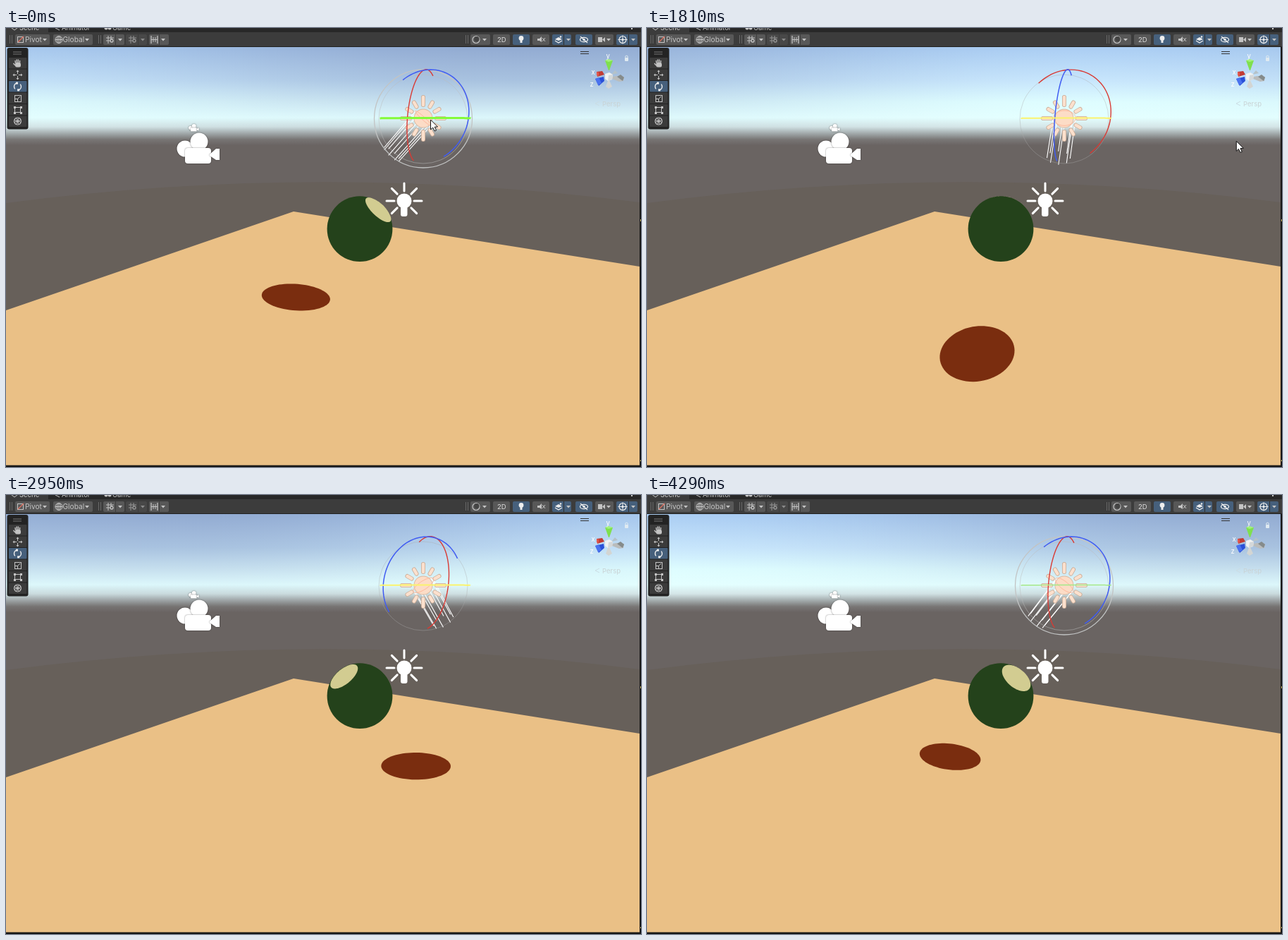
Animation of 901x622 px, one loop 4910 ms. Source, as an HTML page with a canvas:

```html
<!DOCTYPE html>
<html lang="en">
<head>
<meta charset="utf-8">
<title>Rotating sun in a scene view</title>
<style>
  html, body { margin: 0; width: 100%; height: 100%; overflow: hidden; background: #191919; }
  canvas { display: block; }
</style>
</head>
<body>
<canvas id="stage" width="901" height="622"></canvas>
<script>
const c = document.getElementById('stage').getContext('2d');
const LOOP = 4910, TAU = Math.PI * 2, RAD = Math.PI / 180;
const { sin, cos, floor, min, max, hypot, atan2 } = Math;

// ---- Camera: horizontal X/Z, Y up, origin at the eye ----
const FOCAL = 513, TILT = 20.5 * RAD;
const project = ([x, y, z]) => {
  const depth = z * cos(TILT) - y * sin(TILT);
  const up = y * cos(TILT) + z * sin(TILT);
  return [450 + FOCAL * x / depth, 323 - FOCAL * up / depth];
};
const dot = (a, b) => a[0] * b[0] + a[1] * b[1] + a[2] * b[2];
const mix = (...terms) => [0, 1, 2].map(i => terms.reduce((s, [k, v]) => s + k * v[i], 0));
const unit = v => mix([1 / hypot(...v), v]);
const UP = [0, 1, 0];
const TO_VIEWER = [0, sin(TILT), -cos(TILT)];
const heading = a => [sin(a), 0, cos(a)];

const BALL = [0.565, -1.5627, 5.362], BALL_R = 0.5, GROUND_Y = -2.98;
const SUN = [0.277, 0.006, 1.07], SUN_PITCH = 50 * RAD;

// ---- Timing: sun heading in degrees at given times ----
const KEYS = [[490, -63.7], [1270, -115.6], [1810, -161.5], [2650, -258.5],
              [3240, -324.3], [3650, -367], [4282, -405]];
const START = KEYS[0][1], END_TIME = 4282;

function stepTime(t) {
  if (t < 490) return 490;
  if (t < 3182) return 490 + 60 * floor((t - 490) / 60);
  return min(END_TIME, 3182 + 57.9 * floor((t - 3182) / 57.9 + 1e-6));
}

function headingAt(t) {
  const last = KEYS.length - 1;
  if (t >= KEYS[last][0]) return KEYS[last][1];
  const i = max(0, KEYS.findIndex(k => k[0] > t) - 1);
  const slope = j => {
    const a = KEYS[max(0, j - 1)], b = KEYS[min(last, j + 1)];
    return (b[1] - a[1]) / (b[0] - a[0]);
  };
  const [t0, v0] = KEYS[i], [t1, v1] = KEYS[i + 1], d = t1 - t0, u = (t - t0) / d;
  return v0 * (1 + 2 * u) * (1 - u) ** 2 + v1 * u * u * (3 - 2 * u)
    + slope(i) * d * u * (1 - u) ** 2 + slope(i + 1) * d * u * u * (u - 1);
}

// ---- Drawing helpers ----
function rect(x, y, w, h, color) { c.fillStyle = color; c.fillRect(x, y, w, h); }
function box(x, y, w, h, r, color) {
  c.beginPath(); c.roundRect(x, y, w, h, r); c.fillStyle = color; c.fill();
}
function trace(points, close) {
  c.beginPath();
  points.forEach(p => c.lineTo(...p));
  if (close) c.closePath();
}
function poly(color, ...points) { trace(points, true); c.fillStyle = color; c.fill(); }
function line(color, width, ...points) {
  trace(points); c.strokeStyle = color; c.lineWidth = width; c.stroke();
}
function disc(x, y, r, color) { c.beginPath(); c.arc(x, y, r, 0, TAU); c.fillStyle = color; c.fill(); }
function ring(x, y, r, color, width) {
  c.beginPath(); c.arc(x, y, r, 0, TAU); c.strokeStyle = color; c.lineWidth = width; c.stroke();
}
function text(s, x, y, size, color) {
  c.font = `${size}px Inter, sans-serif`; c.fillStyle = color; c.fillText(s, x, y);
}
function sweep(from, to, n, f) {
  return Array.from({ length: n + 1 }, (_, i) => f(from + (to - from) * i / n));
}

// ---- Sky ----
const SKY_Y = [27, 75, 105, 127, 140, 150, 158, 166];
function skyGradient(colors) {
  const g = c.createLinearGradient(0, 27, 0, 166);
  colors.split(' ').forEach((col, i) => g.addColorStop((SKY_Y[i] - 27) / 139, '#' + col));
  return g;
}
const DIM_SKY = skyGradient('92abd2 a9c3e0 c6dfee dcf7fb c9dadd 9a9fa1 767372 6a6463');
const BRIGHT_SKY = skyGradient('aacdf3 c8e6fc defdff e4ffff d5e6e8 a1a9aa 7a7877 6a6463');

function drawSky(yaw) {
  rect(0, 27, 899, 139, DIM_SKY);
  // The sky is brightest towards the sun and directly away from it.
  for (let x = 0; x < 899; x += 6) {
    c.globalAlpha = cos(yaw - atan2(x - 447, FOCAL)) ** 2;
    rect(x, 27, 6, 139, BRIGHT_SKY);
  }
  c.globalAlpha = 1;
  rect(0, 166, 899, 260, '#6a6462');
  c.beginPath(); c.moveTo(0, 248); c.quadraticCurveTo(450, 189, 899, 247);
  c.lineTo(899, 420); c.lineTo(0, 420); c.fillStyle = '#67605a'; c.fill();
}

// ---- Ground, shadow and ball ----
function drawWorld(yaw) {
  poly('#eac086', [0, 400], [408, 260], [899, 338], [899, 620], [0, 620]);

  const away = heading(yaw), side = heading(yaw + Math.PI / 2);
  const reach = (BALL[1] - GROUND_Y) / Math.tan(SUN_PITCH);
  const foot = [BALL[0], GROUND_Y, BALL[2]];
  poly('#7a2d0f', ...sweep(0, TAU, 72, a => project(mix([1, foot],
    [reach + BALL_R / sin(SUN_PITCH) * cos(a), away], [BALL_R * sin(a), side]))));

  disc(502, 284.7, 46.4, '#24421b');

  // Lit cap; points behind the outline are moved onto it.
  const light = mix([-cos(SUN_PITCH), away], [sin(SUN_PITCH), UP]);
  const tangent = mix([sin(SUN_PITCH), away], [cos(SUN_PITCH), UP]);
  const view = unit(mix([-1, BALL])), rim = BALL_R / hypot(...BALL), cap = 29.5 * RAD;
  poly('#d2cc91', ...sweep(0, TAU, 120, a => {
    let n = mix([cos(cap), light], [sin(cap) * cos(a), tangent], [sin(cap) * sin(a), side]);
    const facing = dot(n, view);
    if (facing < rim) {
      n = mix([rim, view], [Math.sqrt(1 - rim * rim), unit(mix([1, n], [-facing, view]))]);
    }
    return project(mix([1, BALL], [BALL_R, n]));
  }));
}

// ---- Scene icons ----
function cameraIcon(x, y, scale) {
  c.save(); c.translate(x, y); c.scale(scale, scale);
  c.shadowColor = '#0008'; c.shadowBlur = 2;
  disc(12, 23, 11.5, '#fff'); disc(32, 13, 12.5, '#fff');
  box(12, 22, 37, 22, 4, '#fff');
  poly('#fff', [47, 31], [56, 23], [61, 23], [61, 39], [56, 39], [47, 33]);
  c.restore();
}

function bulbIcon() {
  c.lineCap = 'round';
  for (let i = -3; i <= 3; i++) {
    const a = i * 45 * RAD, dx = sin(a), dy = -cos(a);
    line('#fff', 3, [565 + 14 * dx, 245 + 14 * dy], [565 + 25 * dx, 245 + 25 * dy]);
  }
  c.lineCap = 'butt';
  disc(565, 245, 10.5, '#fff');
  box(560, 252, 9.5, 15, 3, '#fff');
}

function sunIcon() {
  c.lineCap = 'round';
  for (const [color, width] of [['#c9ab96', 6], ['#fbe0cd', 4.4]]) {
    for (let i = 0; i < 12; i++) {
      const a = i * 30 * RAD, far = i % 3 ? 26 : 30;
      line(color, width, [592 + 19 * cos(a), 128 + 19 * sin(a)],
        [592 + far * cos(a), 128 + far * sin(a)]);
    }
  }
  c.lineCap = 'butt';
  disc(592, 128, 13.5, '#d9b9a2'); disc(592, 128, 12.6, '#fcdcc6');
}

// ---- Rotation handle of the sun ----
function handleArc(dir, second, color, width) {
  const mid = atan2(dot(second, TO_VIEWER), dot(dir, TO_VIEWER));
  line(color, width, ...sweep(mid - Math.PI / 2, mid + Math.PI / 2, 48,
    a => project(mix([1, SUN], [0.12 * cos(a), dir], [0.12 * sin(a), second]))));
}

function drawHandle(yaw, dragging, hovered) {
  const away = heading(yaw), side = heading(yaw + Math.PI / 2);
  const forward = mix([cos(SUN_PITCH), away], [-sin(SUN_PITCH), UP]);
  const across = mix([sin(SUN_PITCH), away], [cos(SUN_PITCH), UP]);
  const onDisc = a => mix([1, SUN], [0.03 * cos(a), side], [0.03 * sin(a), across]);
  for (let i = 0; i < 8; i++) {
    const from = onDisc(i * TAU / 8);
    line('#fff', 1.1, project(from), project(mix([1, from], [0.13, forward])));
  }
  sunIcon();
  line('#ffb89c', 1, ...sweep(0, TAU, 40, a => project(onDisc(a))));

  ring(592, 129, 63, dragging ? '#aaaaaa66' : '#bbbbbb80', 1);
  if (!dragging) ring(592, 128.5, 69.5, '#c2c4c4', 1.3);
  const turn = (dragging ? yaw : START * RAD) + 277 * RAD;
  handleArc(heading(turn), UP, '#d93a34', 1.4);
  handleArc(heading(turn - Math.PI / 2), UP, '#405cf2', 1.5);
  const [color, width] = dragging ? ['#fbf36c', 2] : hovered ? ['#84fb38', 3] : ['#a5e887', 1.5];
  handleArc([0, 0, -1], [1, 0, 0], color, width);
}

// ---- Editor interface ----
const INK = '#c4c4c4', BLUE = '#46607c';

function arrowDown(x, color = INK) { poly(color, [x - 3, 15], [x + 3, 15], [x, 18.5]); }

function toolbar() {
  rect(0, 0, 901, 6, '#282828'); rect(0, 0, 60, 6, '#3c3c3c');
  rect(0, 6, 901, 21, '#3c3c3c'); rect(0, 26, 901, 1, '#222');
  text('Scene', 19, 3, 9.5, '#d2d2d2');
  text('Animator', 79, 3, 9.5, INK);
  text('Game', 151, 3, 9.5, INK);
  line(INK, 1, [8, 0], [12, 3], [16, 0]); line(INK, 1, [70, 0], [76, 3]);
  disc(142, 0, 2.5, INK); disc(147, 0, 2.5, INK);
  rect(887, 0, 2, 2, INK);
  for (const x of [5, 131, 652]) { rect(x, 10, 1, 12, '#696969'); rect(x + 3, 10, 1, 12, '#696969'); }

  const buttons = [[13, 49], [67, 56], [138, 30], [170, 30, '#484848'], [203, 28], [659, 28], [691, 24],
    [719, 24, BLUE], [747, 24], [775, 27, BLUE], [808, 24, BLUE], [836, 26], [866, 30, BLUE]];
  for (const [x, w, color] of buttons) box(x, 9, w, 15, 2, color || '#585858');
  for (const x of [55, 115, 162, 223, 679, 798, 855, 890]) arrowDown(x);
  arrowDown(194, '#8a8a8a');
  rect(155, 9, 1, 15, '#3c3c3c'); rect(187, 9, 1, 15, '#3c3c3c'); rect(217, 9, 1, 15, '#3c3c3c');
  rect(791, 9, 1, 15, '#303030'); rect(883, 9, 1, 15, '#303030');

  c.strokeStyle = INK; c.lineWidth = 1; c.strokeRect(16.5, 12.5, 8, 8);
  line('#e07060', 1.2, [17, 20], [25, 12]);
  text('Pivot', 27, 20, 10.2, INK);
  ring(75, 16.5, 5, INK, 1); line(INK, 1, [70, 16.5], [80, 16.5]); line(INK, 1, [75, 11.5], [75, 21.5]);
  c.beginPath(); c.ellipse(75, 16.5, 2.5, 5, 0, 0, TAU); c.stroke();
  text('Global', 80.5, 20, 10.2, INK);

  for (const [x, ink] of [[142, INK], [174, '#969696']]) {
    line(ink, 1, [x, 14], [x + 11, 14]); line(ink, 1, [x, 18], [x + 6, 18]);
    line(ink, 1, [x + 3, 11], [x + 3, 22]); line(ink, 1, [x + 7, 11], [x + 7, 16]);
    ring(x + 8, 18, 2, ink, 1.3);
  }
  line(INK, 1.3, [206, 11], [206, 22]); line(INK, 1.3, [215, 11], [215, 22]);
  line(INK, 1, [206, 16.5], [215, 16.5]); line(INK, 1, [209, 13], [209, 20]); line(INK, 1, [212, 13], [212, 20]);

  ring(667, 16.5, 5, INK, 1.2); disc(668, 15.5, 3.5, '#444');
  text('2D', 697, 20, 9.5, '#ddd');
  disc(731, 14.5, 3.4, '#eee'); rect(729.5, 16, 3, 5, '#eee');
  poly(INK, [754, 15], [757, 15], [760, 12], [760, 20], [757, 18], [754, 18]);
  line(INK, 1, [761, 14], [765, 19]); line(INK, 1, [765, 14], [761, 19]);
  poly('#eee', [779, 16], [784, 13], [789, 16], [784, 18]);
  line('#eee', 1.3, [779, 18], [784, 21], [789, 18]); disc(787, 12.5, 1.3, '#eee');
  c.beginPath(); c.ellipse(820, 16.5, 5.5, 3.2, 0, 0, TAU); c.strokeStyle = '#eee'; c.stroke();
  disc(820, 16.5, 1.7, '#eee'); line('#eee', 1.2, [815, 12], [825, 21]);
  rect(840, 13, 6, 7, INK); poly(INK, [846, 16.5], [850, 13], [850, 20]);
  ring(875, 16.5, 5, '#eee', 1.2); line('#eee', 1, [868.5, 16.5], [881.5, 16.5]);
  line('#eee', 1, [875, 10.5], [875, 22.5]); disc(875, 16.5, 1.5, '#eee');
}

function toolPanel() {
  box(1.5, 28, 30, 115.5, 3, '#232323');
  rect(10, 33.5, 12, 1, '#777'); rect(10, 36.5, 12, 1, '#777');
  for (let i = 0; i < 6; i++) box(4, 42 + i * 16.5, 25.5, 15.5, 1, i === 2 ? BLUE : '#3b3b3b');

  box(13, 49, 8, 6.5, 2.5, INK);
  for (let i = 0; i < 4; i++) line(INK, 1.4, [13.5 + i * 2, 50], [13 + i * 2.2, i % 3 ? 44.5 : 46]);
  line(INK, 1.4, [13, 53], [10.5, 50]);
  line(INK, 1, [11, 66.5], [22, 66.5]); line(INK, 1, [16.5, 61], [16.5, 72]);
  for (let i = 0; i < 4; i++) {
    c.save(); c.translate(16.5, 66.5); c.rotate(i * Math.PI / 2);
    poly(INK, [-2, -4.5], [2, -4.5], [0, -7]); c.restore();
  }
  disc(16.5, 66.5, 1.5, '#3b3b3b');
  c.strokeStyle = '#eee'; c.lineWidth = 1.4;
  for (const a of [2.4, 5.54]) {
    c.beginPath(); c.arc(16.5, 83, 5, a, a + 2.1); c.stroke();
    const x = 16.5 + 5 * cos(a + 2.1), y = 83 + 5 * sin(a + 2.1);
    rect(x - 1.5, y - 1.5, 3, 3, '#eee');
  }
  c.strokeStyle = INK; c.lineWidth = 1;
  c.strokeRect(12.5, 95.5, 9, 9); c.strokeRect(12.5, 100.5, 4, 4);
  line(INK, 1, [16.5, 100.5], [20, 97]);
  c.strokeStyle = INK; c.strokeRect(12.5, 112.5, 8, 7);
  for (const x of [11, 20]) for (const y of [111, 119]) rect(x, y, 3, 3, INK);
  ring(16.5, 132, 5, INK, 1); disc(16.5, 132, 1.6, INK);
  for (let i = 0; i < 4; i++) {
    const a = (i + 0.5) * Math.PI / 2;
    ring(16.5 + 3.4 * cos(a), 132 + 3.4 * sin(a), 1.8, INK, 1);
  }
}

function axisGizmo() {
  rect(815, 33, 12, 1, '#333'); rect(815, 36, 12, 1, '#333');
  text('y', 851.5, 43, 9.5, '#fff');
  text('x', 830.5, 66, 9.5, '#fff');
  text('z', 828.5, 83, 9.5, '#fff');
  poly('#b9bcbc', [855, 70], [866, 68], [877, 69], [876, 75], [870, 76]);
  poly('#858b8b', [867, 69], [872, 66], [877, 70], [875, 75]);
  poly('#d3d5d3', [855, 72], [860, 83], [855, 86], [851, 83]);
  poly('#b5c2c8', [859, 66], [864, 60], [868, 64]);
  poly('#c23b34', [838, 62], [846, 61], [849, 66], [839, 69]);
  poly('#e2574d', [838, 62], [841, 63], [841, 68], [838, 67]);
  poly('#2a50d8', [836, 72], [848, 69], [849, 75], [841, 82]);
  poly('#4a72ee', [836, 72], [841, 70], [845, 78], [840, 81]);
  poly('#7fe04e', [850, 46], [861, 46], [856, 60], [855, 60]);
  poly('#a2f27c', [850, 46], [855, 44], [861, 46], [855, 48]);
  poly('#f0f2f2', [850, 65], [856, 63], [861, 66], [860, 73], [854, 75], [850, 72]);
  poly('#d4d8da', [855, 67], [861, 66], [860, 73], [854, 75]);
  text('Persp', 846, 110.5, 9.5, '#c9d3d5');
  line('#cbdde4', 1, [842, 104], [836, 107], [842, 110]);
  box(878, 42, 5, 5, 1, '#dfeaf1'); ring(880.5, 41, 1.8, '#dfeaf1', 1);
}

function frameEdges() {
  rect(899, 27, 2, 595, '#161616'); rect(0, 619.5, 901, 2.5, '#161616');
  rect(900, 271, 1, 3, '#c8b45a'); rect(900, 612, 1, 2, '#c8b45a');
}

function cursor(x, y) {
  const shape = [[0, 0], [0, 14], [3.2, 11], [5.6, 16], [8, 15], [5.7, 10.2], [10, 10]];
  trace(shape.map(([dx, dy]) => [x + dx, y + dy]), true);
  c.fillStyle = '#fff'; c.fill();
  c.strokeStyle = '#111'; c.lineWidth = 1; c.stroke();
}

function draw(t) {
  const now = stepTime(t), degrees = headingAt(now), yaw = degrees * RAD;
  const dragging = t >= 310 && now < END_TIME;
  drawSky(yaw);
  drawWorld(yaw);
  cameraIcon(242, 148, 1);
  cameraIcon(259, 136, 0.24);
  bulbIcon();
  drawHandle(yaw, dragging, t < 310);
  axisGizmo();
  toolPanel();
  toolbar();
  const dragged = 2.39 * (START - degrees);
  cursor(602.5 + dragged, 130 + 0.13 * dragged);
  frameEdges();
}

const begin = performance.now();
function tick() {
  draw((performance.now() - begin) % LOOP);
  requestAnimationFrame(tick);
}
tick();
</script>
</body>
</html>
```
